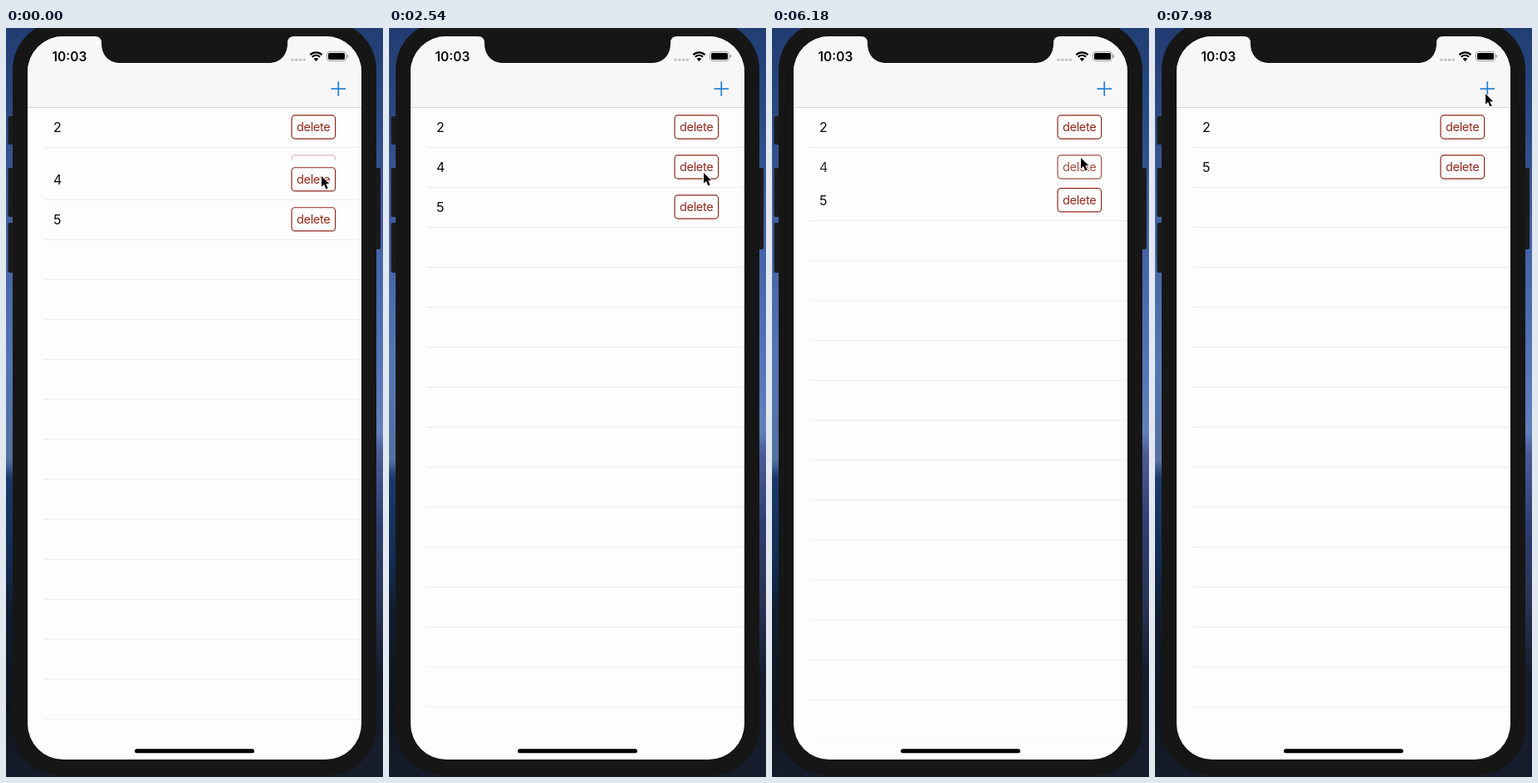
Write an HTML page with a canvas that moves like this. It is 454 by 900 pixels and loops after 8000 ms.

```html
<!DOCTYPE html>
<html lang="en">
<head>
<meta charset="utf-8">
<title>Deleting list rows</title>
<style>
html, body { margin: 0; width: 100%; height: 100%; overflow: hidden; background: #161616; }
canvas { display: block; width: 454px; height: 900px; }
</style>
</head>
<body>
<canvas id="stage"></canvas>
<script>
const W = 454, H = 900, LOOP = 8000;
const ROW = 48, TOP = 95.5, LINES = 15;
const FONT = 'Inter, Roboto, sans-serif';
const BEZEL = '#161616', PAPER = '#fdfdfd', INK = '#0a0a0a', RUST = '#90291a';

const canvas = document.getElementById('stage');
const ctx = canvas.getContext('2d');
const dpr = window.devicePixelRatio || 1;
canvas.width = W * dpr;
canvas.height = H * dpr;
ctx.scale(dpr, dpr);

// Two deletions: start time and what the list holds while it plays
const edits = [
  { start: -170, gone: '3', left: ['2', '4', '5'] },
  { start: 6128, gone: '4', left: ['2', '5'] }
];

// Pointer tip: time, x, y
const pointerPath = [
  [0, 380, 178], [2200, 380, 178], [2500, 379, 174], [4300, 379, 174],
  [5100, 372, 151], [5600, 372, 151], [5950, 372, 156],
  [7000, 372, 156], [7800, 398, 79], [8000, 398, 79]
];

function spring(ms) {
  const x = Math.max(0, ms) * 0.014;
  return 1 - (1 + x) * Math.exp(-x);
}

function pointerAt(t) {
  const i = Math.max(1, pointerPath.findIndex(k => k[0] > t));
  const [t0, x0, y0] = pointerPath[i - 1];
  const [t1, x1, y1] = pointerPath[i];
  const u = (t - t0) / (t1 - t0), e = u * u * (3 - 2 * u);
  return [x0 + (x1 - x0) * e, y0 + (y1 - y0) * e];
}

function fillRound(x, y, w, h, r, color) {
  ctx.fillStyle = color;
  ctx.beginPath();
  ctx.roundRect(x, y, w, h, r);
  ctx.fill();
}

function strokeRound(x, y, w, h, r, color, width) {
  ctx.strokeStyle = color;
  ctx.lineWidth = width;
  ctx.beginPath();
  ctx.roundRect(x, y, w, h, r);
  ctx.stroke();
}

function label(str, x, y, font, color, align = 'left', spacing = 0) {
  ctx.font = `${font} ${FONT}`;
  ctx.letterSpacing = spacing + 'px';
  ctx.textAlign = align;
  ctx.fillStyle = color;
  ctx.fillText(str, x, y);
}

function sky(x, w, stops) {
  const g = ctx.createLinearGradient(0, 0, 0, H);
  stops.forEach(([y, c]) => g.addColorStop(y / H, c));
  ctx.fillStyle = g;
  ctx.fillRect(x, 0, w, H);
}

function drawWallpaper() {
  sky(0, W / 2, [[0, '#213c72'], [100, '#2b4880'], [200, '#3d5b9c'], [400, '#5475b4'],
    [520, '#53709f'], [540, '#1b3a6a'], [640, '#122c54'], [700, '#101d30'],
    [820, '#0e151c'], [900, '#161c2c']]);
  sky(W / 2, W / 2, [[0, '#213e74'], [120, '#2c4b86'], [270, '#4464a8'], [400, '#5474b8'],
    [485, '#6280bc'], [510, '#4c5c98'], [600, '#2e3d70'], [690, '#2a3454'],
    [780, '#141c2c'], [900, '#161c2c']]);
}

function drawPhone() {
  [[106, 34], [168, 59], [234, 60]].forEach(([y, h]) => fillRound(2.5, y, 8, h, 2, '#1a1a1c'));
  fillRound(443, 168, 8, 98, 2, '#1a1a1c');
  fillRound(8, -8, 438, 906, 58, BEZEL);
}

function drawNotch() {
  ctx.fillStyle = BEZEL;
  ctx.beginPath();
  ctx.moveTo(107, 9);
  ctx.lineTo(107, 10);
  ctx.quadraticCurveTo(115, 10, 115, 18);
  ctx.bezierCurveTo(115, 32, 123, 42, 138, 42);
  ctx.lineTo(316, 42);
  ctx.bezierCurveTo(331, 42, 339, 32, 339, 18);
  ctx.quadraticCurveTo(339, 10, 347, 10);
  ctx.lineTo(347, 9);
  ctx.fill();
}

function drawStatus() {
  label('10:03', 55.5, 39.7, '600 15.5px', INK);
  for (let i = 0; i < 4; i++) fillRound(343 + i * 4.8, 36.4, 3.6, 3.6, 1.8, '#c6c6c6');

  ctx.strokeStyle = ctx.fillStyle = '#050505';
  ctx.lineWidth = 2.1;
  const a = Math.PI * 0.25;
  [10, 6.6].forEach(r => {
    ctx.beginPath();
    ctx.arc(373.4, 39.4, r, -Math.PI / 2 - a, -Math.PI / 2 + a);
    ctx.stroke();
  });
  ctx.beginPath();
  ctx.moveTo(373.4, 39.9);
  ctx.arc(373.4, 39.9, 4, -Math.PI / 2 - a, -Math.PI / 2 + a);
  ctx.fill();

  strokeRound(386.5, 28.5, 23, 11, 3.2, '#9c9c9c', 1);
  fillRound(388, 30, 20, 8, 1.8, '#000');
  fillRound(410.6, 32, 1.6, 4, 0.8, '#9c9c9c');
}

function drawHeader() {
  ctx.fillStyle = '#f7f7f8';
  ctx.fillRect(26, 10, 402, 85);
  ctx.fillStyle = '#d6d6d6';
  ctx.fillRect(26, 95, 402, 1);
  drawStatus();
  ctx.fillStyle = '#2580d4';
  ctx.fillRect(391.5, 72.2, 17.5, 1.7);
  ctx.fillRect(399.4, 64.3, 1.7, 17.5);
}

function drawRow(text, y) {
  label(text, 57, y + 29.3, '400 16px', INK);
  strokeRound(344, y + 9.4, 52.6, 28.2, 4, RUST, 1.2);
  label('delete', 370.2, y + 28.8, '400 14.5px', RUST, 'center', -0.3);
}

function drawSeparator(y, alpha = 1) {
  ctx.globalAlpha = alpha;
  ctx.fillStyle = '#ececea';
  ctx.fillRect(45.5, y - 0.5, 382.5, 1);
  ctx.globalAlpha = 1;
}

function drawList(t) {
  const edit = t < edits[1].start ? edits[0] : edits[1];
  const p = spring(t - edit.start);
  const gap = ROW * (1 - p), second = TOP + ROW;

  // The leaving row fades while the rows below slide over it
  ctx.save();
  ctx.beginPath();
  ctx.rect(26, second, 402, gap);
  ctx.clip();
  ctx.globalAlpha = 1 - p;
  drawRow(edit.gone, second);
  ctx.restore();

  drawSeparator(second);
  for (let i = 2; i <= LINES; i++) drawSeparator(TOP + ROW * i + gap, i === LINES ? p : 1);
  edit.left.forEach((text, i) => drawRow(text, TOP + ROW * i + (i ? gap : 0)));
}

function drawPointer(x, y) {
  ctx.save();
  ctx.translate(x, y);
  ctx.beginPath();
  [[0, 0], [0, 12.8], [3, 10.1], [5.3, 15.6], [7.6, 14.6], [5.3, 9.3], [9.2, 9.3]]
    .forEach(([px, py]) => ctx.lineTo(px, py));
  ctx.closePath();
  ctx.lineJoin = 'round';
  ctx.lineWidth = 1.8;
  ctx.strokeStyle = '#fff';
  ctx.stroke();
  ctx.fillStyle = '#000';
  ctx.fill();
  ctx.restore();
}

function draw(t) {
  drawWallpaper();
  drawPhone();
  fillRound(26, 10, 402, 869, 43, PAPER);
  ctx.save();
  ctx.clip();
  drawList(t);
  drawHeader();
  ctx.restore();
  drawNotch();
  fillRound(155, 866.3, 144, 5, 2.5, '#000');
  drawPointer(...pointerAt(t));
}

const begin = performance.now();
function tick() {
  draw((performance.now() - begin) % LOOP);
  requestAnimationFrame(tick);
}
tick();
</script>
</body>
</html>
```
